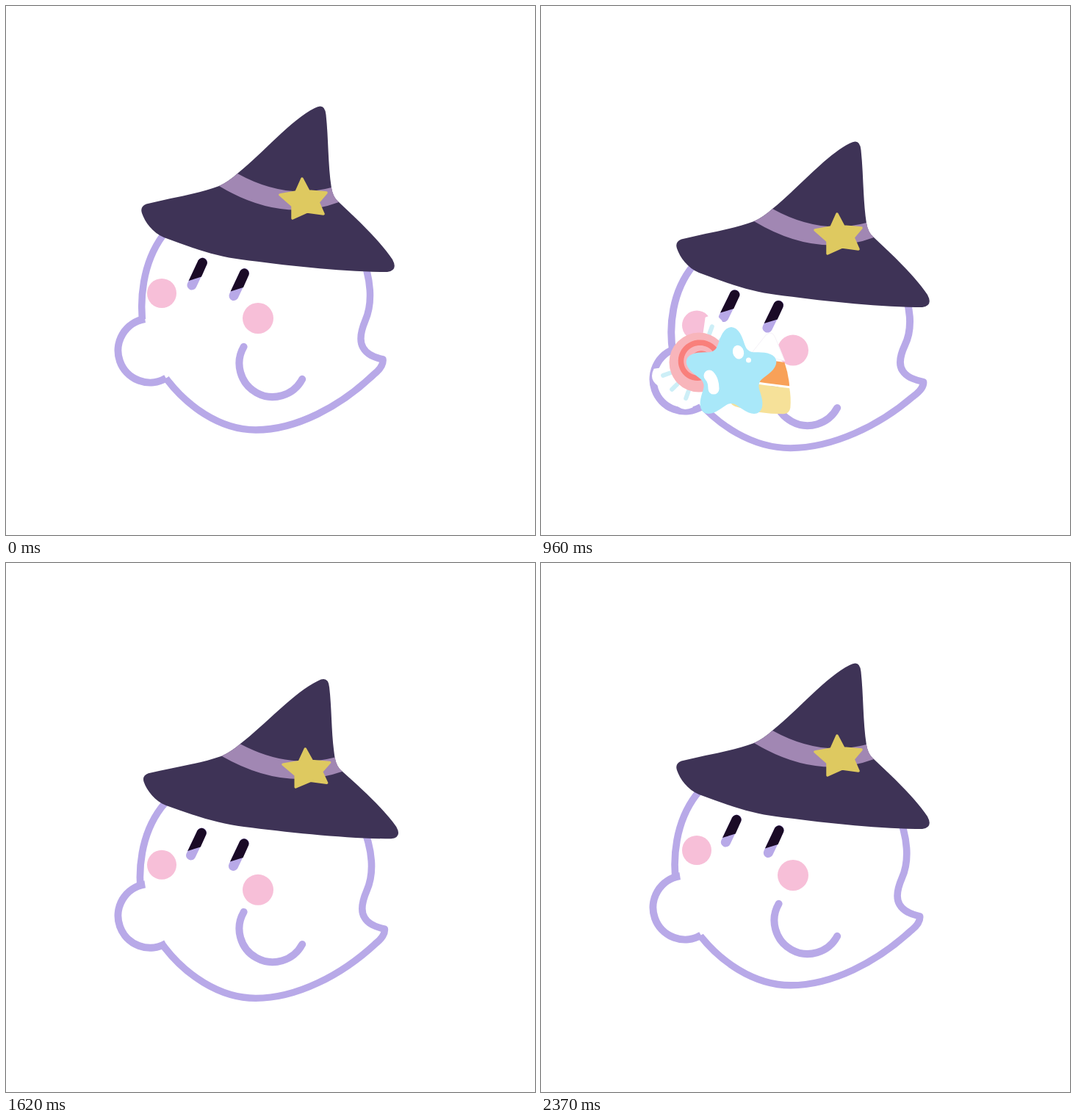
Animation, 720 px wide and 720 px high, one loop 2400 ms. Source, as an HTML page:

```html
<!DOCTYPE html>
<html lang="en">
<head>
<meta charset="utf-8">
<title>Little ghost tossing sweets</title>
<style>
  html, body { margin: 0; width: 100%; height: 100%; overflow: hidden; background: #fff; }
  svg { display: block; width: 100vw; height: 100vh; }
  .line { stroke: #b8a9e8; fill: #fff; }
</style>
</head>
<body>
<svg viewBox="0 0 720 720">
  <path id="body" class="line" stroke-width="9.500" stroke-linejoin="round"
    d="M187 440C181 400 186 350 213 313C236 280 285 257 355 257C420 257 465 295 482 334C498 372 499 405 489 428C484 440 480 455 486 465C491 474 500 478 513 481C514 490 505 498 500 502C455 545 395 577 340 577C290 577 245 543 218 507C205 490 195 470 187 440Z"/>
  <g id="hand">
    <circle r="43.500" fill="#fff"/>
    <path id="handArc" class="line" stroke-width="10" style="fill:none"/>
  </g>
  <g id="eyes">
    <g id="eye">
      <path d="M267.500 349L253 380" stroke="#b8a9e8" stroke-width="13" stroke-linecap="round"/>
      <path d="M248.600 374L261.600 346.300A6.500 6.500 0 0 1 273.400 351.700L266 368.500Z" fill="#1a0a26"/>
    </g>
    <use href="#eye" x="57" y="14.500"/>
  </g>
  <g id="cheeks" fill="#f7bfd8">
    <circle cx="212" cy="391" r="20"/>
    <circle cx="343" cy="425" r="21"/>
  </g>
  <g id="arm"><path id="armArc" class="line" stroke-width="10" stroke-linecap="round"/></g>
  <g id="hat">
    <path fill="#3e3356" d="M420 139Q434 131 435.500 148C439 180 438 215 443 248Q445 260 452 266C480 292 510 321 526 345Q534 360 519 362C460 362 380 353 320 345C285 341 250 328 215 315C200 309 189 294 185 282Q182 273 191 269.500C225 261 260 256 290 245Q303 239 315 228C350 200 388 155 420 139Z"/>
    <path fill="#a187b3" d="M290 245Q303 239 315 228Q380 264 443 247Q445 260 453 267Q375 296 290 245Z"/>
    <path fill="#dec960" stroke="#dec960" stroke-width="3.500" stroke-linejoin="round" d="M403 235L412 252L436 254L425 267L432 283L410 280L390 289L390 272L373 257L395 253Z"/>
  </g>
  <g id="sweets">
    <g id="corn">
      <path fill="#fff" stroke="#f6f3f8" d="M-24-35L-6-66Q1-76 8-66L26-35Q0-38-24-35Z"/>
      <path stroke="#fff" stroke-width="4" d="M-37 .5H37"/>
      <path fill="#f8a158" d="M-24-33Q0-33 26-33Q34-17 37.500-1Q0 0-37.500-1Q-33-18-24-33Z"/>
      <path fill="#f6e199" d="M-38 2Q0 3 38 2Q42 14 43 29Q43 37 35 39Q0 44-34 38Q-44 35-43 27Q-42 14-38 2Z"/>
    </g>
    <g id="lolly">
      <g id="wraps"></g>
      <circle r="40.500" fill="#f8b5bb"/>
      <path id="swirl" fill="none" stroke="#f97f7b" stroke-width="7.500" stroke-linecap="round"/>
    </g>
    <g id="star">
      <path id="starShape" fill="#a9e8f9"/>
      <g fill="#fff">
        <ellipse cx="9.500" cy="-30" rx="7.500" ry="9.500" transform="rotate(-15 9.500 -30)"/>
        <circle cx="23.500" cy="-19" r="3.500"/>
        <path d="M-30 2Q-24 8-24 20" fill="none" stroke="#fff" stroke-width="15" stroke-linecap="round"/>
      </g>
    </g>
  </g>
</svg>
<script>
const LOOP = 2400;
const $ = id => document.getElementById(id);
const set = (id, k, v) => $(id).setAttribute(k, v);
const move = (id, v) => set(id, 'transform', v);
const polar = (r, deg) => [r * Math.cos(deg * Math.PI / 180), r * Math.sin(deg * Math.PI / 180)];
const trace = (n, point) => 'M' + Array.from({ length: n + 1 }, (_, i) => point(i / n)).join('L');

const span = (t, a, b) => Math.min(1, Math.max(0, (t - a) / (b - a)));
const ease = (t, a, b) => { const u = span(t, a, b); return u * u * (3 - 2 * u); };
const bump = (t, a, b) => Math.sin(Math.PI * span(t, a, b));
const arc = (t, mid, half) => Math.max(0, 1 - ((t - mid) / half) ** 2);
const out = (u, power) => 1 - (1 - u) ** power;
const back = u => 1 + 2.7 * (u - 1) ** 3 + 1.7 * (u - 1) ** 2;

// Start in the hands, then travel, spin and growth of the toss
const SWEETS = {
  corn: { x: 302, y: 474, turn: 8, size: .97, dx: 220, dy: -274, drop: 110, spin: 31, grow: .14, dip: 0 },
  lolly: { x: 215, y: 446, turn: 45, size: 1, dx: -106, dy: -244, drop: 17, spin: -58, grow: 0, dip: .12 },
  star: { x: 259, y: 462, turn: 0, size: 1, dx: 15, dy: -249, drop: 0, spin: -43, grow: .44, dip: 0 }
};

function build() {
  set('starShape', 'd', trace(120, u => {
    const lobe = (1 + Math.cos(10 * Math.PI * u)) / 2;
    return polar(40 + 24 * lobe ** 1.2, 360 * u - 90);
  }) + 'Z');
  set('swirl', 'd', trace(70, u => polar(28 - 25 * u ** 1.6, -57 - 570 * u)));
  set('armArc', 'd', `M${polar(45.5, 28)}A45.5 45.5 0 1 1 ${polar(45.5, 210)}`);
  let wraps = '';
  for (const side of [-90, 90]) {
    let fan = 'M0 0L' + polar(62, side - 37);
    for (const a of [-12, 12, 37]) fan += 'Q' + polar(74, side + a - 12) + ' ' + polar(62, side + a);
    wraps += `<path d="${fan}Z" fill="#fff"/>`;
    for (const a of [-25, 0, 25])
      wraps += `<path d="M${polar(42, side + a)}L${polar(52, side + a)}" stroke="#cdeff7" stroke-width="6" stroke-linecap="round"/>`;
  }
  $('wraps').innerHTML = wraps;
}

function draw(t) {
  const release = 1 - ease(t, 1080, 1200);
  const bob = 12 * ease(t, 0, 570) * release;
  const crouch = span(t, 720, 1080) ** 2 * release;
  const stretch = bump(t, 1110, 1350);
  const jump = arc(t, 1325, 140);
  const sink = ease(t, 1410, 1720) * (1 - ease(t, 1740, 2300));
  const lift = ease(t, 1080, 1230) * (1 - ease(t, 1290, 1460));

  // Squash in the crouch, then a fading wobble after landing
  const wobble = ease(t, 1380, 1460) * .045 * Math.cos(Math.PI * (t - 1440) / 430) * Math.exp((1440 - t) / 1500);
  const tall = 1 - .135 * crouch - wobble;
  const wide = 1 + (1 - tall) * .75;

  const bodyY = bob + 43 * crouch - 70 * jump + 22 * stretch + 28 * sink;
  move('body', `translate(${340 + 17 * stretch} ${577 + bodyY})` +
    `matrix(${1 - .11 * stretch} ${.06 * stretch} ${.11 * stretch} ${1 + .12 * stretch} -340 -577)` .replace('-340 -577)', '0 0)') +
    `translate(10 -107) scale(${wide} ${tall}) translate(-350 -470)`);

  const faceY = bob + 71 * crouch - 89 * jump + 32 * sink;
  move('cheeks', `translate(0 ${faceY})`);
  move('eyes', `translate(${350 - 350 * wide - 2 * stretch} ${faceY - 5 * stretch - 3 * sink}) scale(${wide} 1)`);

  const handX = -6 * bump(t, 180, 560);
  const handY = 88 * crouch + 18 * sink;
  set('handArc', 'd', `M${polar(43.5, 261 + 50 * lift)}A43.5 43.5 0 1 0 ${polar(43.5, 60)}`);
  move('hand', `translate(${196 + handX - 28 * lift} ${469 + handY - 111 * lift}) rotate(${-12 * lift})`);
  move('arm', `translate(${363 + 37 * lift} ${486.5 + handY - 99 * lift}) rotate(${101 * lift})`);

  // The hat leaves the head and falls back a moment later
  const hatX = 4 * ease(t, 1110, 1230) - 4 * ease(t, 1600, 2000);
  const hatY = bob + 81 * crouch - 134 * arc(t, 1350, 148) + 35 * sink;
  const hatTall = 1 - .075 * stretch - .06 * sink;
  move('hat', `translate(${357 + hatX} ${136 + hatY}) scale(${1 + (1 - hatTall) * .2} ${hatTall}) translate(-357 -136)`);

  const pop = back(span(t, 360, 600));
  const fade = 1 - ease(t, 1480, 1590);
  const fly = span(t, 1110, 1530);
  set('sweets', 'display', t > 360 && fade > 0 ? 'inline' : 'none');
  set('sweets', 'opacity', fade);
  for (const [id, s] of Object.entries(SWEETS)) {
    const drift = out(fly, 2.5);
    const x = s.x + s.dx * drift;
    const y = s.y + handY + s.dy * out(fly, 4) + s.drop * fly * fly;
    const size = (s.size + s.grow * fly - s.dip * stretch) * pop;
    move(id, `translate(${x} ${y}) rotate(${s.turn + s.spin * drift}) scale(${size})`);
  }
}

// Poses hold for 60 ms, with a 30 ms one every 510 ms
function hold(t) {
  const u = (t + 390) % 510;
  return t - (u < 30 ? u : (u - 30) % 60);
}

build();
draw(0);
const start = performance.now();
(function tick() {
  draw(hold((performance.now() - start) % LOOP));
  requestAnimationFrame(tick);
})();
</script>
</body>
</html>
```
